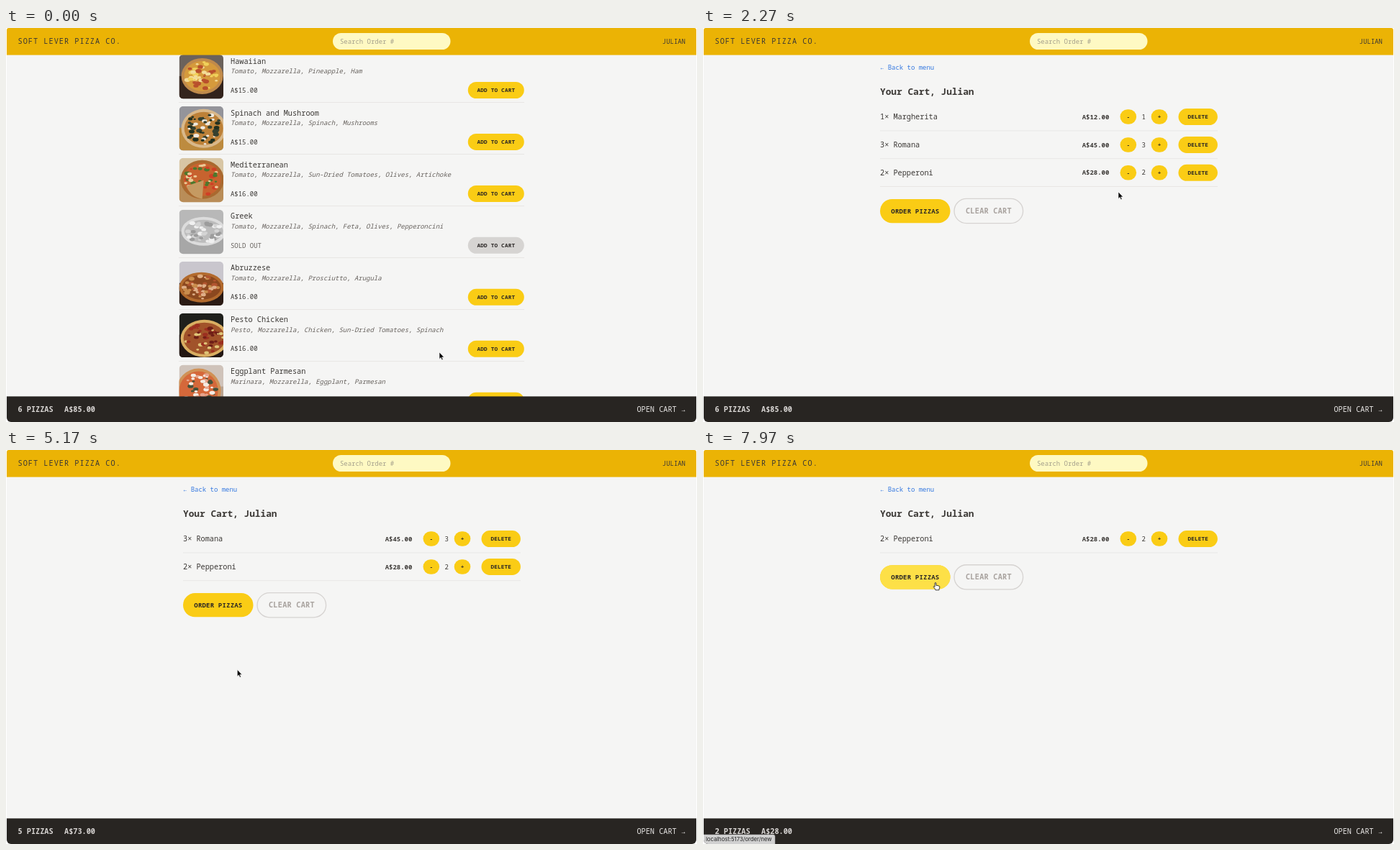
Animation of 960 by 548 pixels, one loop 8 s. Source, as an HTML page:

```html
<!DOCTYPE html>
<html lang="en">
<head>
<meta charset="utf-8">
<title>Pizza cart</title>
<style>
  html, body { margin: 0; width: 100%; height: 100%; overflow: hidden; background: #fff; }
  svg { display: block; width: 960px; height: 548px; clip-path: inset(0 1px round 3px 3px 6px 6px); }
  text { font-family: "Noto Sans Mono", "DejaVu Sans Mono", monospace; white-space: pre; }
</style>
</head>
<body>
<svg viewBox="0 0 960 548">
  <defs><clipPath id="photo"><rect width="61.4" height="61.4" rx="5.5"/></clipPath></defs>
  <rect width="960" height="548" fill="#f5f5f4"/>
  <g id="menu"></g>
  <g id="cart"></g>
  <g id="chrome"></g>
  <g id="bar"></g>
  <path id="arrow" d="M0 0V9.4L2.1 7.4L3.6 10.8L5.2 10.1L3.7 6.9H6.6Z" stroke="#fff" stroke-width=".6"/>
  <path id="hand" d="M-.9 .7Q0-.6 .9 .7V4L3 4.2L5.4 5.1Q6 5.4 5.8 6.8L5 9V10.5H0L-.8 8.6L-3 6Q-2.6 4.6-.9 6Z" fill="#fff" stroke="#111" stroke-width=".8" stroke-linejoin="round"/>
</svg>
<script>
const LOOP = 8000, USER = 'Julian';
const XS = 7.68, SM = 8.96, MD = 10.24, XL = 12.8;
const INK = '#3b3835', YELLOW = '#facc15', LIGHT = '#fde047', LINE = '#e7e5e4';
const $ = id => document.getElementById(id);
const clamp = v => Math.max(0, Math.min(1, v));

// cy is the middle of the capital letters
const text = (x, cy, str, size, fill = INK, weight = 400, more = '') =>
  `<text x="${x}" y="${cy + size * .355}" font-size="${size}" fill="${fill}" font-weight="${weight}" ${more}>${str}</text>`;
const box = (x, y, w, h, fill, r = 0, more = '') =>
  `<rect x="${x}" y="${y}" width="${w}" height="${h}" fill="${fill}" rx="${r}" ${more}/>`;
const MID = 'text-anchor="middle"', END = 'text-anchor="end"';
const money = n => `A$${n.toFixed(2)}`;
const label = (x, cy, str, size, fill = '#292524') =>
  text(x + size * .0125, cy, str, size, fill, 600, `${MID} letter-spacing=".025em"`);

// ---- Menu page ----
// name, ingredients, price, backdrop top, backdrop bottom, crust, base, toppings, centre, radii
const pizzas = [
  ['Hawaiian', 'Tomato, Mozzarella, Pineapple, Ham', 15, '#6b625c', '#33231c', '#c08a4b', '#d59a3c',
    ['#f0d05a', '#b9502c', '#f3dc98'], 32, 30, 29, 25],
  ['Spinach and Mushroom', 'Tomato, Mozzarella, Spinach, Mushrooms', 15, '#94949a', '#bd8b3f', '#d9b88a', '#bd8138',
    ['#22301f', '#35402f', '#efe9df'], 34, 31, 31, 27],
  ['Mediterranean', 'Tomato, Mozzarella, Sun-Dried Tomatoes, Olives, Artichoke', 16, '#d8c6a4', '#b98d58', '#a9692f', '#c7632f',
    ['#4d782c', '#cf3f26', '#ecc995'], 32, 30, 30, 27],
  ['Greek', 'Tomato, Mozzarella, Spinach, Feta, Olives, Pepperoncini', 0, '#9e9e9e', '#868686', '#d2d2d2', '#a4a4a4',
    ['#eee', '#777', '#c6c6c6'], 34, 30, 31, 20],
  ['Abruzzese', 'Tomato, Mozzarella, Prosciutto, Arugula', 16, '#c9c6cd', '#2b1b14', '#b26a2d', '#8b481f',
    ['#dfae87', '#b2552f', '#c98c4c'], 31, 36, 31, 21],
  ['Pesto Chicken', 'Pesto, Mozzarella, Chicken, Sun-Dried Tomatoes, Spinach', 16, '#1f201c', '#231713', '#d9ae62', '#a1532a',
    ['#9c2f20', '#6f1f17', '#dfc477'], 35, 35, 33, 26],
  ['Eggplant Parmesan', 'Marinara, Mozzarella, Eggplant, Parmesan', 16, '#cfc3ba', '#b9a492', '#d09155', '#d5683a',
    ['#f4ebe2', '#e6a48c', '#46523a'], 27, 36, 31, 31],
];

function photo(row, top, [, , price, back, front, crust, base, tops, cx, cy, rx, ry]) {
  const rnd = k => { const v = Math.sin(k * 12.9898 + row * 78.233) * 43758.5453; return v - Math.floor(v); };
  const oval = (x, y, a, b, fill) => `<ellipse cx="${x}" cy="${y}" rx="${a}" ry="${b}" fill="${fill}"/>`;
  let s = box(0, 0, 62, 62, back) + box(0, 30, 62, 32, front) +
    oval(cx, cy + 2, rx, ry, front) + oval(cx, cy, rx, ry, crust) + oval(cx, cy, rx - 4, ry - 4, base);
  for (let i = 0; i < 46; i++) {
    const a = rnd(i) * 6.283, d = Math.sqrt(rnd(i + 50)) * .8, size = 1.4 + rnd(i + 100) * 2.2;
    s += oval(cx + Math.cos(a) * d * rx, cy + Math.sin(a) * d * ry, size * 1.2, size * .8, tops[i % 3]);
  }
  if (row == 2) s += '<path d="M34 31L10 39Q16 55 32 57Z" fill="#c59a62"/>';
  return `<g transform="translate(240.6 ${top})" clip-path="url(#photo)" opacity="${price ? 1 : .7}">${s}</g>`;
}

$('menu').innerHTML = pizzas.map((p, i) => {
  const y = 71.95 * i, [name, parts, price] = p;
  return photo(i, 36.9 + y, p) +
    text(312, 46 + y, name, MD, INK, 500) +
    text(312, 60 + y, parts, SM, '#67625e', 400, 'font-style="italic"') +
    text(312, 86.5 + y, price ? money(price) : 'SOLD OUT', SM, price ? INK : '#67625e', price ? 400 : 500) +
    box(641.8, 75 + y, 78, 23, price ? YELLOW : '#d6d4d2', 11.5) +
    label(680.8, 86.5 + y, 'ADD TO CART', XS) +
    box(240, 103.2 + y, 480, .7, '#e2e0de');
}).join('');

$('chrome').innerHTML =
  box(0, 0, 960, 37.6, '#ebb305') + box(0, 512.4, 960, 36, '#282522') +
  text(16.5, 18.5, 'SOFT LEVER PIZZA CO.', MD, INK, 400, 'letter-spacing=".1em"') +
  box(454, 7, 163.5, 23, '#fef9c3', 11.5) +
  text(464, 18.5, 'Search Order #', SM, '#a5a08c') +
  text(944, 18.5, USER.toUpperCase(), SM, INK, 500, END) +
  text(944, 530.6, 'OPEN CART →', MD, '#e7e5e4', 400, END);

// ---- Timeline ----
const CART = 1080, ADD = 2780, LESS = 3420, DROP1 = 4420, FOCUS = 6850, DROP2 = 7150;
const path = [ // time, x, y
  [30, 602, 451], [800, 917.5, 533.5], [1270, 917.5, 533.5], [2070, 577, 228], [2300, 577, 228],
  [2680, 634, 165], [2940, 634, 165], [3260, 591, 165.8], [3740, 591, 165.8], [4050, 688, 128],
  [4430, 688, 128], [5080, 321.3, 305.5], [5220, 321.3, 305.5], [5920, 680, 183], [6500, 692.5, 131],
  [7200, 692.5, 131], [7780, 323, 184.3],
];
const hovers = [ // control, from, to
  ['open', 700, 1340], ['r+', 2580, 3020], ['r-', 3150, 3810], ['m-x', 3930, DROP1], ['rx', DROP1, 4540],
  ['px', 6060, 6250], ['rx', 6330, DROP2], ['px', DROP2, 7290], ['clear', 7500, 7590], ['order', 7590, 9999],
].map(([k, a, b]) => [k == 'm-x' ? 'mx' : k, a, b]);
const focuses = [['r+', ADD, LESS], ['r-', LESS, DROP1], ['rx', FOCUS, DROP2]];
const statuses = [['cart', 780, 1450, 77], ['order/new', 7720, 9999, 99]];
const active = (list, t) => list.find(([, a, b]) => t >= a && t < b);

function cursorAt(t) {
  const i = path.findIndex(p => p[0] > t);
  if (i < 0) return path[path.length - 1].slice(1);
  if (!i) return path[0].slice(1);
  const [t0, x0, y0] = path[i - 1], [t1, x1, y1] = path[i];
  const u = (t - t0) / (t1 - t0), e = u * u * (3 - 2 * u);
  return [x0 + (x1 - x0) * e, y0 + (y1 - y0) * e];
}

const glow = (key, t) => hovers.filter(h => h[0] == key)
  .reduce((sum, [, a, b]) => sum + clamp((t - a) / 200) - clamp((t - b) / 200), 0);

function button(t, key, x, cy, w, h, str, size) {
  const rect = (grow, fill, more) =>
    box(x - grow, cy - h / 2 - grow, w + 2 * grow, h + 2 * grow, fill, h / 2 + grow, more);
  const ring = focuses.some(f => f[0] == key && active([f], t));
  return (ring ? rect(3.2, LIGHT) + rect(1.3, '#fff') : '') +
    rect(0, YELLOW) + rect(0, LIGHT, `opacity="${clamp(glow(key, t))}"`) +
    label(x + w / 2, cy, str, size);
}

const itemsAt = t => [
  ['m', 'Margherita', t < DROP1 ? 1 : 0, 12],
  ['r', 'Romana', t >= DROP2 ? 0 : t >= ADD && t < LESS ? 4 : 3, 15],
  ['p', 'Pepperoni', 2, 14],
].filter(item => item[2]);

function cartPage(t, items) {
  const rows = items.map(([key, name, n, price], i) => {
    const y = 123.6 + 38.85 * i;
    return text(246, y, `${n}× ${name}`, MD, INK) +
      text(564.3, y, money(n * price), SM, INK, 700, END) +
      button(t, key + '-', 579.5, y, 22.6, 20.5, '-', XS) +
      text(612.3, y, n, SM, INK, 500, MID) +
      button(t, key + '+', 622.7, y, 22.6, 20.5, '+', XS) +
      button(t, key + 'x', 660.5, y, 54.4, 23, 'DELETE', XS) +
      box(246, y + 19, 469, .7, '#e2e0de');
  });
  const y = 138 + 38.85 * items.length;
  return text(246, 54.5, '← Back to menu', SM, '#3478e0') +
    text(246, 88.3, `Your Cart, ${USER}`, XL, INK, 600) + rows.join('') +
    button(t, 'order', 246, y, 97.5, 33.3, 'ORDER PIZZAS', SM) +
    box(349, y - 17.1, 95.6, 34.2, '#d6d3d1', 17.1,
      `fill-opacity="${clamp(glow('clear', t))}" stroke="#d6d3d1" stroke-width="1.3"`) +
    label(396.8, y, 'CLEAR CART', MD, '#a8a29e');
}

function barText(t, items) {
  const count = items.reduce((s, i) => s + i[2], 0);
  const total = items.reduce((s, i) => s + i[2] * i[3], 0);
  const status = active(statuses, t);
  return text(16.5, 530.6, `${count} PIZZAS`, MD, '#d9d6d4', 600) +
    text(81, 530.6, money(total), MD, '#d9d6d4', 600) +
    (status ? box(-3, 535, status[3] + 4, 17, '#d0d0d0', 2.5, 'stroke="#aaa" stroke-width=".5"') +
      text(4, 541.7, `localhost:5173/${status[0]}`, 7.7, '#222', 400,
        'style="font-family:Inter,Roboto,sans-serif"') : '');
}

function frame(now) {
  const t = now % LOOP, items = itemsAt(t), onMenu = t < CART;
  $('menu').style.display = onMenu ? '' : 'none';
  $('cart').innerHTML = onMenu ? '' : cartPage(t, items);
  $('bar').innerHTML = barText(t, items);
  const pointing = !!active(hovers, t);
  for (const id of ['arrow', 'hand']) {
    $(id).setAttribute('transform', `translate(${cursorAt(t)})`);
    $(id).style.display = (id == 'hand') == pointing ? '' : 'none';
  }
  requestAnimationFrame(frame);
}
frame(0);
</script>
</body>
</html>
```
